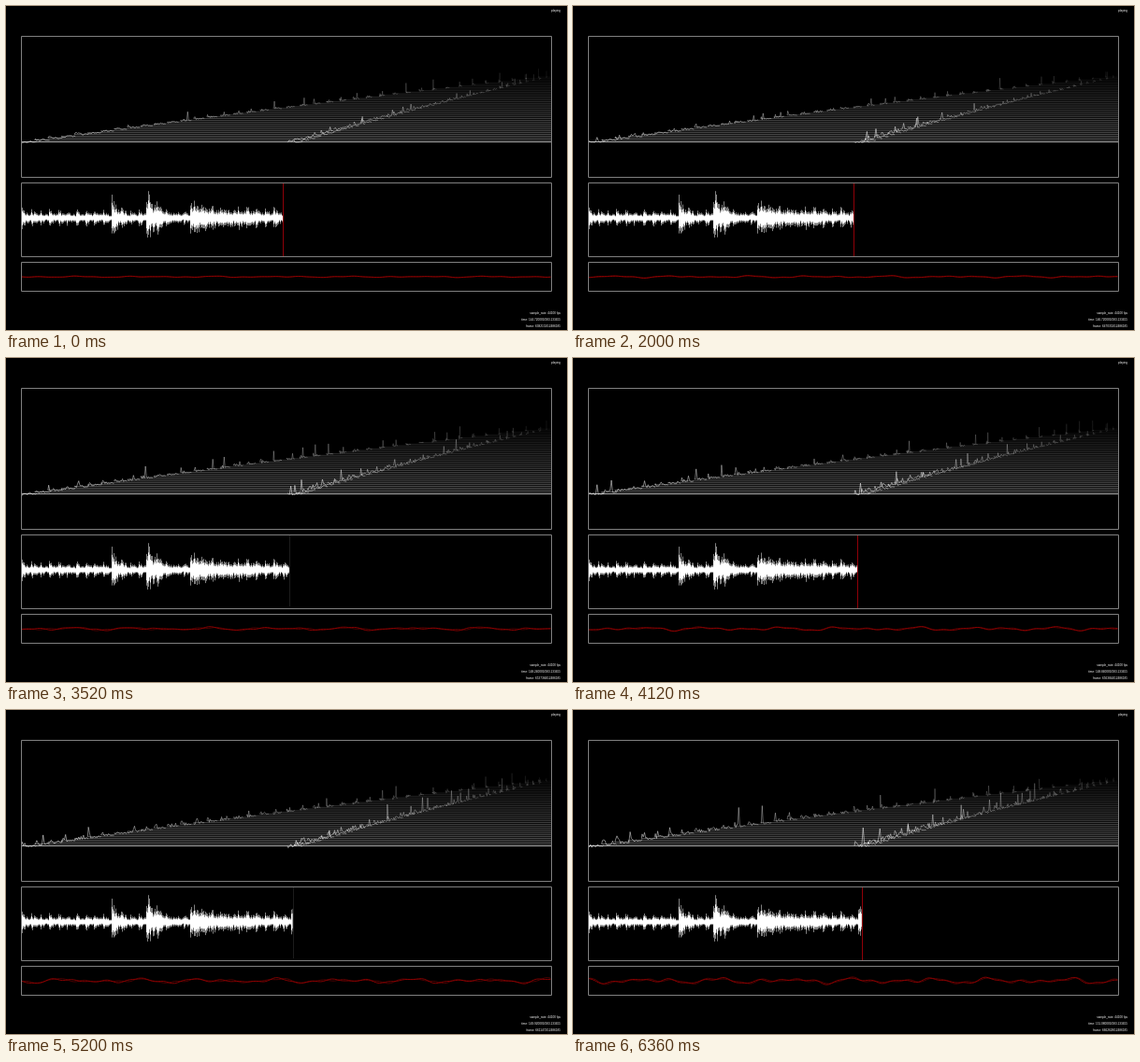
Animation of 600 by 347 pixels, one loop 6400 ms. Source, as an HTML page with a canvas:

```html
<!DOCTYPE html>
<html lang="en">
<head>
<meta charset="utf-8">
<title>Audio spectrum player</title>
<style>
  html, body { margin: 0; width: 100%; height: 100%; overflow: hidden; background: #000; }
  canvas { display: block; }
</style>
</head>
<body>
<canvas id="stage" width="600" height="347"></canvas>
<script>
const ctx = document.getElementById('stage').getContext('2d');
const LOOP = 6400, STEP = 40, STEPS = LOOP / STEP;
const LEFT = 16.5, RIGHT = 583.5, WIDTH = RIGHT - LEFT;
const START = 144.72, DURATION = 283.133455, SAMPLE_RATE = 44100;
const PIXELS_PER_SECOND = 1.938;
const ROWS = 40, BINS = 12, BASE_Y = 145.5, RISE = 71;

// Loud moments in the recording
const ACCENTS = [
  { at: 113, size: 15, decay: 8 },
  { at: 150, size: 23, decay: 10 },
  { at: 197, size: 13, decay: 40 },
  { at: 305, size: 13, decay: 6 }
];

// Repeatable noise in 0..1
function noise(a, b = 0, c = 0) {
  let n = Math.imul(a + 1013, 374761393) ^ Math.imul(b + 71, 668265263) ^ Math.imul(c + 7, 2147483647);
  n = Math.imul(n ^ (n >>> 13), 1274126177);
  n = Math.imul(n ^ (n >>> 15), 2246822519);
  return ((n ^ (n >>> 16)) >>> 0) / 4294967296;
}

const white = alpha => `rgba(255,255,255,${alpha})`;

function stroke(points, color, width = 1) {
  ctx.beginPath();
  points.forEach(([x, y]) => ctx.lineTo(x, y));
  ctx.strokeStyle = color;
  ctx.lineWidth = width;
  ctx.stroke();
}

function frameBox(top, bottom) {
  ctx.strokeStyle = '#808080';
  ctx.lineWidth = 1;
  ctx.strokeRect(LEFT, top, WIDTH, bottom - top);
}

function label(text, y) {
  ctx.font = '3.15px "Liberation Sans", Arial, sans-serif';
  ctx.textAlign = 'right';
  ctx.fillStyle = '#fff';
  ctx.fillText(text, 593, y);
}

function spectrum(step, channel, x, y, pitch) {
  const loud = 4 + 4 * Math.max(0, step / STEPS) ** 1.5;
  const peakBin = Math.floor(noise(step, channel, 90) * 9);
  const peak = loud * (0.3 + 2.2 * noise(step, channel, 91) ** 4);
  const points = [[x, y]];
  for (let bin = 0; bin < BINS; bin++) {
    let value = (noise(step, channel, bin) ** 2 - 0.32) * loud * Math.exp(-bin / 7);
    if (bin === peakBin) value += peak;
    points.push([x + (bin + 0.6) * pitch, y - value]);
  }
  return points;
}

function drawSpectra(step) {
  ctx.lineJoin = 'bevel';
  for (let row = ROWS - 1; row >= 0; row--) {
    const depth = row / ROWS;
    const x = LEFT + depth * WIDTH;
    const middle = (x + RIGHT) / 2 + 1;
    const y = BASE_Y - RISE * depth * (1.12 - 0.12 * depth);
    const pitch = 1.3 * (1 - depth) + 0.1;
    const flat = row ? 0.4 * (1 - depth) + 0.04 : 0.7;
    const bright = 0.9 * (1 - depth) + 0.05;
    stroke([[x, y], [RIGHT, y]], white(flat), row ? 0.85 : 1);
    [x, middle].forEach((start, channel) =>
      stroke(spectrum(step - row, channel, start, y, pitch), white(bright), 0.55));
  }
}

// Regular beats that fade out, plus the accents
function loudness(x) {
  const beat = (x - 17) / 9.6;
  const strength = 4 + 5 * noise(Math.floor(beat), 5);
  const base = 4 + strength * Math.exp(-2.5 * (beat % 1));
  return ACCENTS.reduce((sum, { at, size, decay }) =>
    sum + (x < at ? 0 : size * Math.exp((at - x) / decay)), base);
}

function drawWaveform(end) {
  for (let x = 17; x < end; x++) {
    const level = loudness(x);
    const width = Math.min(1, end - x);
    const bar = (alpha, low, spread) => {
      const top = level * (low + spread * noise(x, 1));
      const bottom = level * (low + spread * noise(x, 2));
      ctx.fillStyle = white(alpha);
      ctx.fillRect(x, 227 - top, width, top + bottom);
    };
    bar(0.5, 0.45, 0.55);
    bar(1, 0.3, 0.35);
  }
}

function drawScope(step) {
  const amp = 0.5 + 1.9 * (step / STEPS) ** 1.5;
  for (let channel = 0; channel < 2; channel++) {
    // The channels share their slow waves and differ in the fast ones
    const wave = (x, n) => {
      const phase = 2 * Math.PI * noise(step, n > 1 ? channel : 0, n + 200);
      return Math.sin(x * 0.085 * 1.55 ** n + phase) * (0.65 - 0.12 * n);
    };
    const points = [];
    for (let x = 17; x <= 583; x += 1.5) {
      const y = [0, 1, 2, 3].reduce((sum, n) => sum + wave(x, n), 0);
      points.push([x, 290 - amp * y]);
    }
    stroke(points, channel ? '#a00000' : '#600000', 0.8);
  }
}

function drawCursor(x, ms) {
  const lit = Math.floor((ms + 400) / 1000) % 2 === 0;
  ctx.fillStyle = lit ? '#900008' : '#1c1c1c';
  ctx.fillRect(Math.round(x), 190, 1, lit ? 78 : 76);
}

function draw(now) {
  const step = Math.floor((now % LOOP) / STEP);
  const ms = step * STEP;
  const seconds = START + ms / 1000;
  const cursor = 16 + seconds * PIXELS_PER_SECOND;

  ctx.fillStyle = '#000';
  ctx.fillRect(0, 0, 600, 347);
  drawSpectra(step);
  drawWaveform(cursor);
  drawScope(step);
  frameBox(32.5, 183.5);
  frameBox(189.5, 268.5);
  frameBox(274.5, 305.5);
  drawCursor(cursor, ms);

  label('playing', 5.8);
  label(`sample_rate: ${SAMPLE_RATE} fps`, 330.2);
  label(`time: ${seconds.toFixed(6)}/${DURATION}`, 337);
  label(`frame: ${Math.round(seconds * SAMPLE_RATE)}/${Math.round(DURATION * SAMPLE_RATE)}`, 343.6);
}

const begin = performance.now();
function tick() {
  draw(performance.now() - begin);
  requestAnimationFrame(tick);
}
tick();
</script>
</body>
</html>
```
